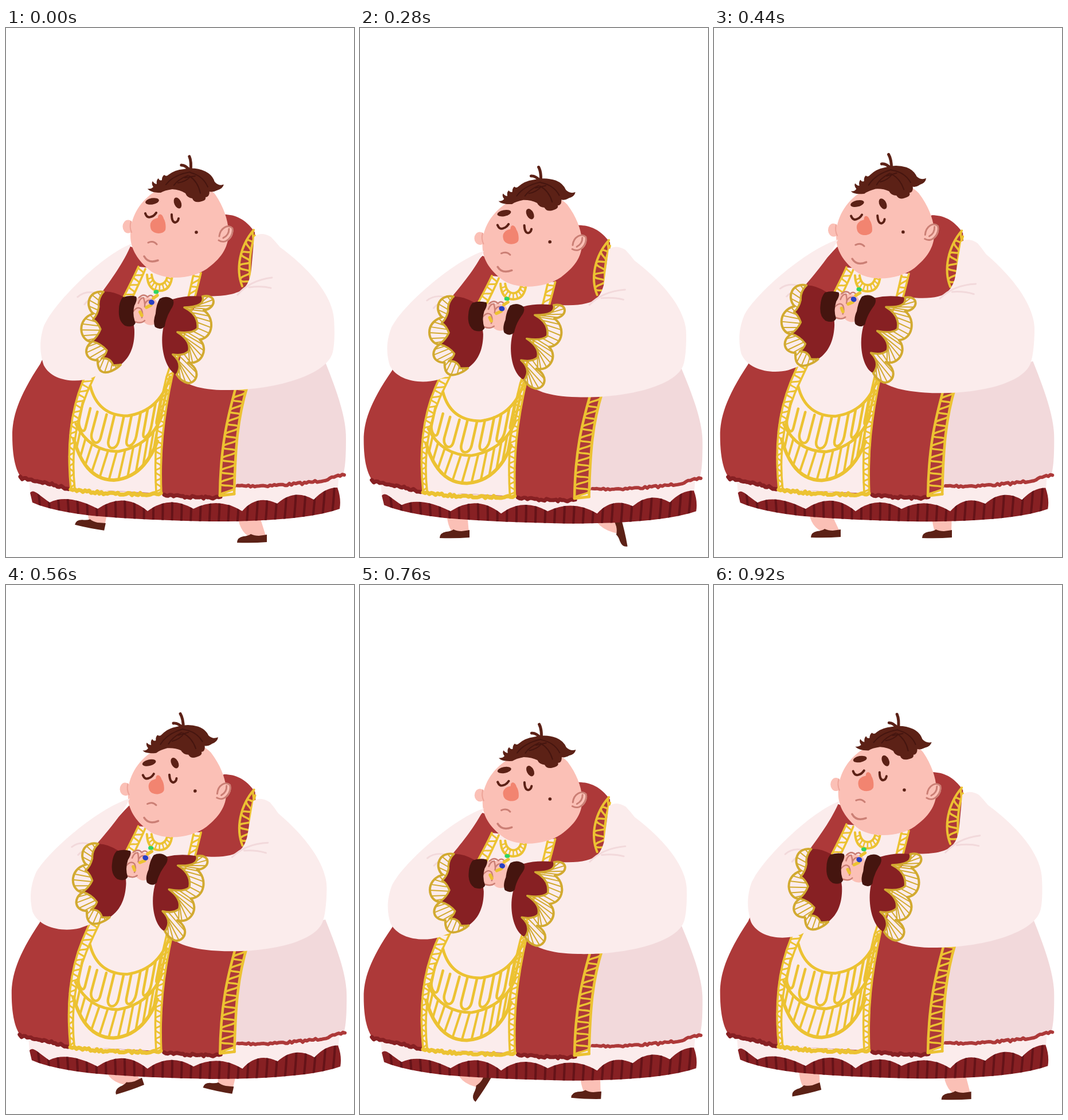
Animation of 607 by 922 pixels, one loop 960 ms. Source, as an HTML page:

```html
<!DOCTYPE html>
<html lang="en">
<head>
<meta charset="utf-8">
<title>Walking priest</title>
<style>
html, body { margin: 0; width: 100%; height: 100%; overflow: hidden; background: #fff; }
svg { display: block; width: 607px; height: 922px; }
path { stroke-linecap: round; stroke-linejoin: round; }
</style>
</head>
<body>
<svg id="stage" viewBox="0 0 607 922"></svg>
<script>
const NS = 'http://www.w3.org/2000/svg';
const stage = document.getElementById('stage');
const RED = '#ad3939', DARK = '#872023', STRIPE = '#651318', WHITE = '#fbecec', PINK = '#f2d9db';
const GOLD = '#ecc232', TRIM = '#d2aa30', SKIN = '#fbc0b6', BLUSH = '#cb7f75', HAIR = '#5c2116', INK = '#45150f';

let seed = 7;
const rnd = () => (seed = seed * 16807 % 2147483647) / 2147483647;

const fill = (d, c) => `<path d="${d}" fill="${c}"/>`;
const line = (d, c, w) => `<path d="${d}" fill="none" stroke="${c}" stroke-width="${w}"/>`;
const oval = (x, y, rx, ry, c, a = 0) =>
  `<ellipse rx="${rx}" ry="${ry}" fill="${c}" transform="translate(${x} ${y}) rotate(${a})"/>`;
const group = (id, body) => `<g id="${id}">${body}</g>`;

// Point on a path at fraction u
function curve(d) {
  const p = document.createElementNS(NS, 'path');
  p.setAttribute('d', d);
  const len = p.getTotalLength();
  return u => {
    const q = p.getPointAtLength(u * len);
    return [+q.x.toFixed(1), +q.y.toFixed(1)];
  };
}

// Rounded zigzag running between two curves
function wave(a, b, n) {
  const A = curve(a), B = curve(b);
  let d = 'M' + A(0);
  for (let i = 0; i < n; i++) {
    const [F, G] = i % 2 ? [B, A] : [A, B];
    d += `C${F((i + .6) / n)} ${G((i + .4) / n)} ${G((i + 1) / n)}`;
  }
  return d;
}

// Row of U shapes hanging from curve a towards curve b
function loops(a, b, n) {
  const A = curve(a), B = curve(b);
  let d = '';
  for (let i = 0; i < n; i++) {
    const u = (i + .2) / n, v = (i + .75) / n;
    const near = w => A(w).map((p, k) => p + (B(w)[k] - p) * .7);
    d += `M${A(u)}L${near(u)}C${B(u)} ${B(v)} ${near(v)}L${A(v)}`;
  }
  return d;
}

function rungs(a, b, n) {
  const A = curve(a), B = curve(b);
  let d = '';
  for (let i = 1; i < n; i++) d += `M${A(i / n)}L${B(i / n)}`;
  return d;
}

// Brushy edge
function rough(d, n, amp) {
  const C = curve(d);
  return 'M' + Array.from({ length: n + 1 }, (_, i) => {
    const [x, y] = C(i / n);
    return [x, (y + (rnd() - .5) * 2 * amp).toFixed(1)];
  }).join('L');
}

const braid = (a, b, n, w, wz) => line(a, GOLD, w) + line(b, GOLD, w) + line(wave(a, b, n), GOLD, wz);

function petticoat() {
  const edge = 'M42,810 Q46,804 56,812 Q68,821 76,827 Q108,811 160,838 Q205,807 247,842 ' +
    'Q285,813 327,838 Q370,816 412,842 Q438,812 473,829 Q503,802 537,822 Q556,801 578,801 ' +
    'Q585,820 582,838 Q520,860 360,860 Q240,858 150,850 Q80,842 46,827 Z';
  let pleats = '';
  for (let x = 58; x < 582; x += 16.5) {
    pleats += `M${x + (x - 300) * .012},800 Q${x + 2},830 ${x - (x - 300) * .012},866`;
  }
  return `<clipPath id="ruffle"><path d="${edge}"/></clipPath>` +
    fill('M40,785 L42,810 L76,830 L160,846 L412,848 L578,810 L581,775 Z', WHITE) +
    fill(edge, DARK) + `<g clip-path="url(#ruffle)">${line(pleats, STRIPE, 4)}</g>`;
}

function robe() {
  const l1 = 'M231,416 C212,460 165,540 134,616 C112,670 106,730 113,803';
  const l2 = 'M243,420 C225,465 180,550 150,616 C126,665 112,730 120,803';
  const r1 = 'M327,430 C318,470 300,550 280,608 C262,680 258,740 262,810';
  const r2 = 'M340,427 C330,470 305,560 291,602 C274,680 268,740 271,811';
  const s1 = 'M401,626 C386,680 374,730 373,815', s2 = 'M421,624 C404,680 400,730 398,812';
  const n1 = 'M432,352 C408,380 400,420 412,450', n2 = 'M434,362 C424,390 424,420 427,444';
  const b1 = 'M147,624 Q160,676 212,676 Q268,668 286,608', top = 'M130,648 Q152,676 208,677 Q262,668 284,624';
  const b2 = 'M122,690 Q145,738 196,738 Q252,728 272,676';
  const b3 = 'M118,716 Q138,788 188,788 Q240,784 264,720';
  const c1 = 'M246,430 Q247,458 268,458 Q288,458 290,430', c2 = 'M254,430 Q256,446 268,447 Q280,446 282,430';
  return fill('M215,380 C130,470 70,560 60,585 C20,645 11,680 11,710 C11,750 18,775 28,785 L110,802 ' +
      'L270,812 Q320,820 372,817 L402,800 L500,640 L440,450 L434,356 C418,333 400,325 380,325 L240,390 Z', RED) +
    fill('M420,622 L556,580 C580,640 593,680 593,715 C593,745 592,765 588,779 Q530,799 400,799 C400,730 405,685 420,622 Z', PINK) +
    fill(l1 + ' L271,811 C268,740 274,680 291,602 C305,560 330,470 340,427 Z', WHITE) +
    line(rough('M25,784 Q70,792 109,803', 26, 2), DARK, 7) +
    line(rough('M276,813 Q330,820 374,818', 30, 2), DARK, 7) +
    line(rough('M404,798 Q535,799 590,778', 50, 2), RED, 6) +
    line(b1, GOLD, 5) + line(b2, GOLD, 5) + line(b3, GOLD, 6) +
    line(loops(top, b2, 6), GOLD, 4.5) + line(rungs(b2, b3, 13), GOLD, 4) +
    braid(l1, l2, 44, 3.5, 3) + braid(r1, r2, 42, 3.5, 3) +
    braid(s1, s2, 18, 4.5, 3.5) + line('M373,815 L398,812', GOLD, 5) + braid(n1, n2, 9, 4, 3.5) +
    line(rough('M113,804 Q190,816 270,811', 44, 2), GOLD, 7) +
    line(c1, GOLD, 4) + line(c2, GOLD, 4) + line(rungs(c1, c2, 10), GOLD, 2.5);
}

function head() {
  const face =
    fill('M252,347 C250,337 258,332 265,331 C265,322 273,323 275,332 C279,338 279,348 278,352 C274,361 253,360 252,347 Z', '#f28470') +
    oval(255, 302, 12, 5.5, HAIR, -10) + oval(299.5, 305, 6, 10, HAIR, -24) +
    line('M243,323 Q246,332 253,329 Q258,328 262,322 M289,325 Q289,338 295,339 Q300,338 301,332', HAIR, 4) +
    line('M248,374 Q257,370 263,377', BLUSH, 3) + line('M241,398 Q248,411 265,405', BLUSH, 3.5) +
    oval(332, 356, 2.8, 2.8, HAIR);
  const hair =
    fill('M247,280 Q254,281 257,277 Q253,271 256,267 Q259,272 263,272 Q262,265 266,262 Q268,267 272,265 ' +
      'Q272,259 276,256 Q279,259 282,257 Q294,247 310,246 Q330,242 348,250 Q360,256 364,268 Q371,276 380,273 ' +
      'Q378,281 368,283 Q360,287 355,285 Q355,295 348,295 Q350,301 338,303 Q328,305 325,297 Q316,296 313,288 ' +
      'Q304,282 290,281 Q276,283 270,287 Q252,287 247,280 Z', HAIR) +
    line('M320,224 Q324,233 322,250 M306,239 Q314,239 321,249', HAIR, 5) +
    line('M321,251 Q292,256 279,273 M318,257 Q300,264 293,274 M322,252 Q344,258 352,277 ' +
      'M320,258 Q335,268 339,288 M312,261 L330,258 M300,270 Q314,268 322,259', INK, 2);
  return oval(213, 346, 9.5, 11.5, SKIN) +
    fill('M217,362 C216,325 240,290 280,275 C320,262 350,272 365,290 C380,312 387,335 388,352 ' +
      'C390,382 375,402 350,420 C325,437 280,441 253,424 C230,406 217,385 217,362 Z', SKIN) +
    line('M218,337 Q215,347 219,356', '#eda398', 2) +
    fill('M372,364 C374,348 388,339 396,350 C399,364 384,380 371,370 Z', SKIN) +
    line('M372,363 C374,348 388,341 395,349 C398,360 385,379 371,370 M389,350 Q389,361 379,366', BLUSH, 3) +
    group('face', face) + group('hair', hair);
}

function trim(outer, inner, back, n) {
  return fill(outer, WHITE) + fill(inner + back, DARK) +
    line(rungs(outer, inner, n), TRIM, 2) + line(outer, TRIM, 4) + line(inner, TRIM, 3.5);
}

function arms() {
  const left = trim(
    'M170,460 C146,456 136,482 152,498 C122,508 128,546 150,547 C134,558 138,580 160,579 C160,602 172,603 184,598 Q195,593 200,587',
    'M170,460 Q160,472 162,486 Q160,500 152,508 Q160,513 165,525 Q160,538 150,546 Q166,550 176,562 Q174,570 167,576 Q182,574 187,588 L200,587',
    ' C220,572 225,548 224,525 Q220,490 206,469 Q185,458 170,460 Z', 22);
  const right = trim(
    'M343,468 C367,462 369,488 345,492 C365,505 362,540 338,543 C355,560 340,588 318,583 C340,595 335,618 318,619 Q305,616 298,604',
    'M343,468 Q348,486 311,487 Q337,500 334,524 Q325,533 299,530 Q323,545 319,563 Q310,572 291,569 Q310,585 298,604',
    ' C280,598 268,560 274,525 Q280,490 290,473 Q315,465 343,468 Z', 24);
  return fill('M219,376 C165,397 82,482 66,520 C57,548 60,570 66,588 C80,615 120,620 150,610 L205,585 L200,500 ' +
      'L168,460 C182,440 205,410 219,376 Z', WHITE) +
    fill('M433,364 Q445,354 462,364 Q470,372 478,382 C530,420 568,465 572,505 C574,530 573,555 570,565 ' +
      'C560,605 470,630 390,631 C340,632 312,622 298,604 L320,500 L345,467 C382,469 406,463 416,453 Q427,440 428,420 Z', WHITE) +
    line('M125,469 Q138,457 158,462 M137,482 Q144,473 152,472 M404,465 Q425,440 464,435 M424,452 Q445,449 462,453', PINK, 3) +
    left + right +
    fill('M219,480 Q228,466 240,470 Q262,466 265,484 L262,515 Q250,522 240,512 Q228,518 220,510 Z', SKIN) +
    line('M232,470 Q240,462 247,469 Q253,462 259,471 M231,480 Q234,470 240,470 Q243,480 242,486 ' +
      'M243,480 Q247,472 254,476 M222,494 Q230,484 236,490 Q240,498 237,505 M225,512 Q236,516 242,510', BLUSH, 2.5) +
    line('M257,471 L264,466 M245,487 L253,483 M234,495 L237,501', GOLD, 5.5) +
    oval(262, 460, 4.5, 3.5, '#2fd463') + oval(254, 478, 5, 4.5, '#2740c4', 20) +
    fill('M203,470 Q215,465 227,468 Q230,473 224,484 Q220,500 226,514 Q222,523 208,519 Q196,512 197,492 Q197,478 203,470 Z', INK) +
    fill('M268,472 Q280,465 291,473 Q295,480 288,490 Q279,505 277,520 Q270,528 260,521 Q256,512 261,498 Q262,482 268,472 Z', INK);
}

const leg = id => `<path id="${id}Shin" fill="${SKIN}"/><path id="${id}Shoe" fill="${HAIR}" ` +
  'd="M-38,13 Q-38,4 -27,2 Q-18,1 -14,-2 Q-8,1 0,1 Q8,0 14,-1 L14,12 Q-10,14 -38,13 Z"/>';

stage.innerHTML = leg('left') + leg('right') +
  group('figure', petticoat() + robe() + group('head', head()) + group('arms', arms()));

// Ankle steps: time, x, y, turn
const LOOP = 960, STEP = 40;
const steps = {
  left: [[0, 160, 861, 12], [120, 165, 870, 0], [280, 177, 876, 0], [440, 207, 875, 0], [560, 224, 864, -18],
    [680, 224, 853, -38], [760, 212, 862, -56], [840, 194, 871, -46], [920, 171, 871, -12], [960, 160, 861, 12]],
  right: [[0, 441, 884, 0], [120, 456, 872, -30], [200, 456, 868, -68], [280, 446, 869, -102], [360, 424, 869, -50],
    [440, 401, 876, 0], [520, 385, 871, 12], [600, 382, 873, 14], [680, 392, 882, 7], [840, 422, 884, 0], [960, 441, 884, 0]]
};
const hips = { left: [160, 160, .5], right: [421, 441, .6] };

function pose(rows, t) {
  const i = rows.findIndex(r => r[0] > t), a = rows[i - 1], b = rows[i];
  const u = (t - a[0]) / (b[0] - a[0]);
  return a.map((v, k) => v + (b[k] - v) * u).slice(1);
}

const move = (id, how) => document.getElementById(id).setAttribute('transform', how);
const swing = (t, period) => (1 - Math.cos(2 * Math.PI * t / period)) / 2;

function draw(t) {
  const k = swing(t, LOOP / 2), r = swing(t - 30, LOOP);
  const sx = 1 + .0165 * k;
  move('figure', `matrix(${sx} 0 0 ${1 - .03 * k} ${302 * (1 - sx)} ${29.75 * k})`);
  move('head', `rotate(${-3.3 * r} 300 430)`);
  move('face', `translate(${2 * r} 0)`);
  move('hair', `rotate(${-4 * r} 248 281)`);
  move('arms', `rotate(${4.6 * r} 330 340)`);
  for (const id in steps) {
    const [x, y, turn] = pose(steps[id], t), [hip, rest, pull] = hips[id];
    const h = hip + (x - rest) * pull, a = turn * Math.PI / 180;
    const foot = s => [x + s * Math.cos(a) - 4 * Math.sin(a), y + s * Math.sin(a) + 4 * Math.cos(a)];
    const heel = foot(13), arch = foot(-14), calf = 840 + (arch[1] - 840) * .8;
    document.getElementById(id + 'Shin').setAttribute('d',
      `M${h - 18},840 L${h + 18},840 L${heel} L${arch} Q${h - 16},${calf} ${h - 18},840 Z`);
    move(id + 'Shoe', `translate(${x} ${y}) rotate(${turn})`);
  }
}

const start = performance.now();
function tick() {
  const t = (performance.now() - start) % LOOP;
  draw(Math.floor(t / STEP) * STEP);
  requestAnimationFrame(tick);
}
tick();
</script>
</body>
</html>
```
